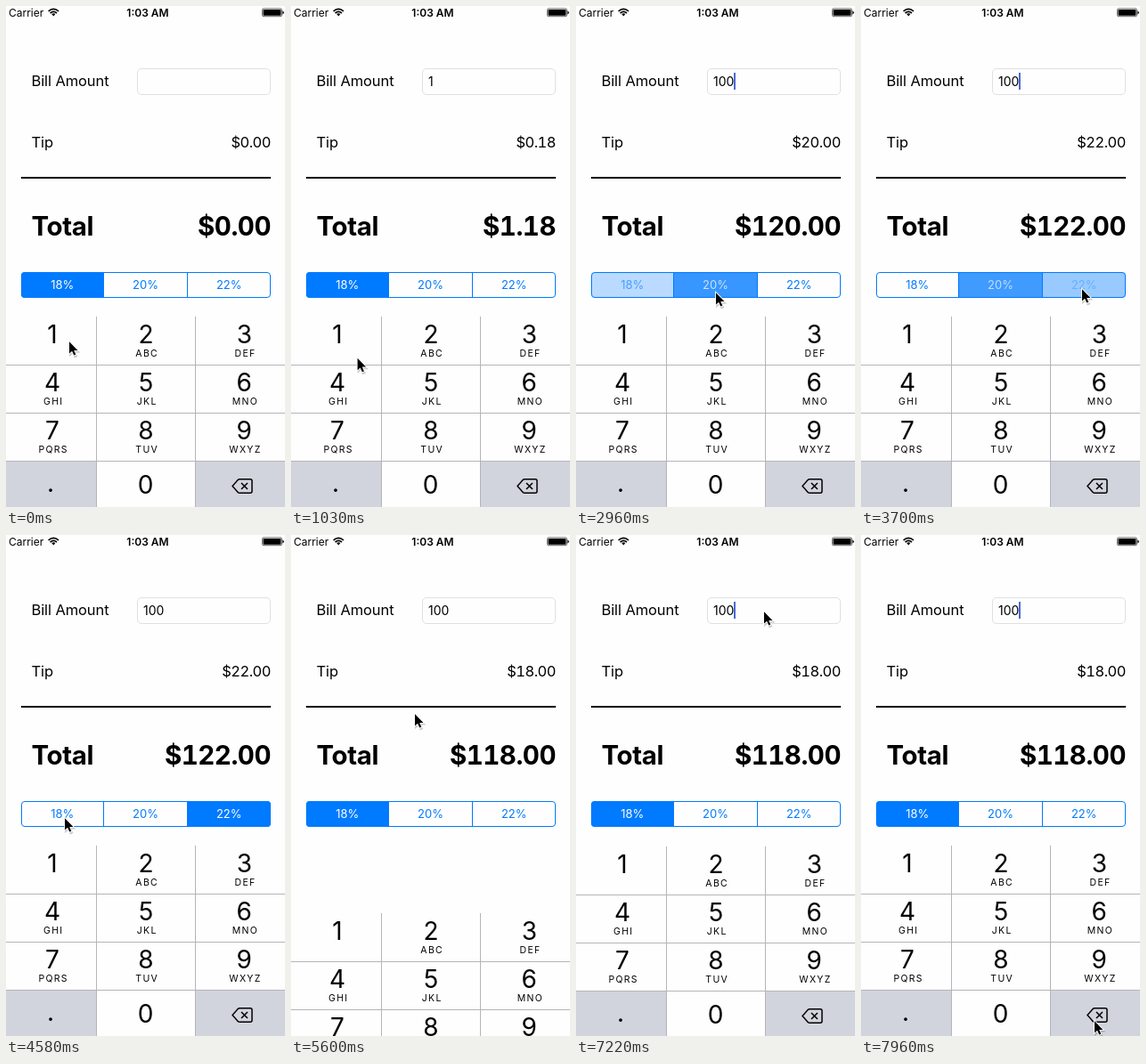
Animation of 313x563 px, one loop 8000 ms. Source, as an HTML page:

```html
<!DOCTYPE html>
<html lang="en">
<head>
<meta charset="utf-8">
<title>Tip calculator</title>
<style>
  html, body { margin: 0; width: 100%; height: 100%; overflow: hidden; background: #fefefe; }
  svg { display: block; width: 313px; height: 563px; }
  text { font-family: Inter, Roboto, sans-serif; font-optical-sizing: none; white-space: pre; }
  .label { font-size: 16.5px; letter-spacing: -.1px; }
  .total { font-size: 29.5px; font-weight: 700; letter-spacing: -.4px; }
  .money { font-variant-numeric: tabular-nums; letter-spacing: -.5px; text-anchor: end; }
  .status { font-size: 12px; }
  .bill { font-size: 14px; }
  .segment { font-size: 13px; }
  .digit { font-size: 28px; }
  .letters { font-size: 10.5px; letter-spacing: 1.3px; }
  .mid { text-anchor: middle; }
</style>
</head>
<body>
<svg viewBox="0 0 313 563">
  <rect width="313" height="563" fill="#fefefe"/>

  <text class="status" x="3" y="11.8">Carrier</text>
  <g fill="none" stroke="#000" stroke-width="1.7">
    <path d="M47.6 5.8Q53.3 .8 59 5.8M49.6 8Q53.3 4.8 57 8"/>
    <path d="M51.2 9.1Q53.3 7.6 55.4 9.1L53.3 11.5Z" fill="#000" stroke="none"/>
  </g>
  <text class="status mid" x="159" y="11.8" font-weight="600">1:03 AM</text>
  <rect x="287.5" y="2.9" width="22" height="8.8" rx="1.6" fill="none" stroke="#000" stroke-width=".6"/>
  <rect x="288.5" y="3.9" width="20" height="6.8" rx=".8"/>
  <path d="M310.4 5.6q1.5 .5 1.5 1.8t-1.5 1.8z"/>

  <text class="label" x="28.5" y="89.7">Bill Amount</text>
  <rect x="147.5" y="70.5" width="149" height="29" rx="4.5" fill="#fefefe" stroke="#e0e0e0"/>
  <text class="bill" id="bill" x="154" y="90"></text>
  <rect id="caret" y="75" width="2" height="19" fill="#4969d9"/>

  <text class="label" x="28.5" y="158.5">Tip</text>
  <text class="label money" id="tip" x="297" y="158.5"></text>
  <rect x="17" y="192" width="280" height="2"/>
  <text class="total" x="28.5" y="258">Total</text>
  <text class="total money" id="total" x="297" y="258"></text>

  <clipPath id="pill"><rect x="17" y="299" width="280" height="29" rx="4"/></clipPath>
  <g id="segments" clip-path="url(#pill)"></g>
  <path d="M109.5 299v29M203.5 299v29" stroke="#007aff"/>
  <rect x="17.5" y="299.5" width="279" height="28" rx="3.5" fill="none" stroke="#007aff"/>

  <g id="keyboard">
    <rect y="349" width="313" height="214" fill="#fefefe"/>
    <path d="M0 511H101V563H0ZM213 511H313V563H213Z" fill="#d1d4dc"/>
    <path id="pressed" fill="#d1d4dc"/>
    <path d="M101.5 349V563M212.5 349V563M0 403.5H313M0 457.5H313M0 511.5H313" stroke="#b5b5b8"/>
    <g id="keys"></g>
    <text class="digit mid" x="50" y="545.5">.</text>
    <g fill="none" stroke="#000" stroke-width="1.5" stroke-linejoin="round">
      <path d="M254 539.5L260.2 532.6Q261 531.7 262.2 531.7H274Q276 531.7 276 533.7V545.3Q276 547.3 274 547.3H262.2Q261 547.3 260.2 546.4Z"/>
      <path d="M264 536l7 7m0-7l-7 7"/>
    </g>
  </g>

  <g id="pointer">
    <g transform="translate(1 1.2) scale(.86)">
      <path d="M1 2V17.5L4.6 14.2 7.2 20 9.6 19 7.1 13.3H12Z" stroke="#000" stroke-width="2" opacity=".2"/>
      <path d="M0 0V15.5L3.6 12.3 6.1 17.9 8.5 16.9 6.1 11.3H11Z" stroke="#fff" stroke-width="2" paint-order="stroke"/>
    </g>
  </g>
</svg>
<script>
const LOOP = 8000, STEP = 147.4, PAD_HEIGHT = 214;
const BLUR = 5450, FOCUS = 6630;
const $ = id => document.getElementById(id);
const clamp = v => Math.min(1, Math.max(0, v));
const ease = p => p * p * (3 - 2 * p);

function add(parent, tag, attrs, content = '') {
  const node = document.createElementNS('http://www.w3.org/2000/svg', tag);
  for (const key in attrs) node.setAttribute(key, attrs[key]);
  node.textContent = content;
  return parent.appendChild(node);
}

const home = { x: 70, y: 376 };
const moves = [
  { from: 150, to: 440, x: 62, y: 375 },
  { from: 960, to: 1300, x: 163, y: 546 },
  { from: 1920, to: 2600, x: 156, y: 321 },
  { from: 3100, to: 3450, x: 247, y: 317 },
  { from: 4220, to: 4560, x: 65, y: 317 },
  { from: 5020, to: 5450, x: 138, y: 200 },
  { from: 5950, to: 6490, x: 210, y: 85 },
  { from: 7300, to: 7950, x: 261, y: 545 }
];
const taps = [{ at: 870, key: '1' }, { at: 1310, key: '0' }, { at: 1460, key: '0' }];
const choices = [{ at: -1000, index: 0 }, { at: 2700, index: 1 }, { at: 3600, index: 2 }, { at: 4700, index: 0 }];
const keyShapes = { 1: 'M0 349H101V403H0Z', 0: 'M102 512H212V563H102Z' };

const segments = [[17, 109.5], [109.5, 203.5], [203.5, 297]].map(([left, right], i) => ({
  fill: add($('segments'), 'rect', { x: left, y: 299, width: right - left, height: 29, fill: '#007aff' }),
  text: add($('segments'), 'text', { class: 'segment mid', x: (left + right) / 2, y: 318 }, 18 + 2 * i + '%')
}));

const columns = [52, 157, 267.3];
['', 'ABC', 'DEF', 'GHI', 'JKL', 'MNO', 'PQRS', 'TUV', 'WXYZ'].forEach((letters, i) => {
  const x = columns[i % 3], y = 379 + 54 * Math.floor(i / 3);
  add($('keys'), 'text', { class: 'digit mid', x, y }, i + 1);
  add($('keys'), 'text', { class: 'letters mid', x: x + 1.2, y: y + 15 }, letters);
});
add($('keys'), 'text', { class: 'digit mid', x: 156.5, y: 548 }, '0');

const pointerAt = t => moves.reduce((p, move) => {
  const k = ease(clamp((t - move.from) / (move.to - move.from)));
  return { x: p.x + (move.x - p.x) * k, y: p.y + (move.y - p.y) * k };
}, home);

// Critically damped spring: falls from 1 to 0 after its start.
function spring(t, start) {
  const x = Math.max(0, t - start) * .013;
  return (1 + x) * Math.exp(-x);
}

function padOffset(t) {
  const hidden = t < FOCUS ? 1 - spring(t, BLUR + 55) : spring(t, FOCUS + 15);
  return Math.round(PAD_HEIGHT * hidden);
}

function caretVisible(t) {
  if (t >= BLUR && t < FOCUS) return false;
  const blinkStart = t < BLUR ? 290 : FOCUS;
  return t >= blinkStart && (t - blinkStart) % 1100 < 700;
}

function segmentLevels(t) {
  const i = choices.findLastIndex(choice => choice.at <= t);
  const p = clamp((t - choices[i].at) / 340);
  const levels = [0, 0, 0];
  if (i > 0) levels[choices[i - 1].index] = 1 - p;
  levels[choices[i].index] = .2 + .8 * p;
  return levels;
}

function draw(time) {
  const t = Math.floor((time % LOOP + 5) / STEP) * STEP;
  const bill = taps.filter(tap => tap.at <= t).map(tap => tap.key).join('');
  const rate = 18 + 2 * choices.findLast(choice => choice.at <= t).index;
  const tip = bill * rate / 100;
  $('bill').textContent = bill;
  $('tip').textContent = '$' + tip.toFixed(2);
  $('total').textContent = '$' + (+bill + tip).toFixed(2);

  $('caret').setAttribute('x', 154 + Math.round(bill && $('bill').getComputedTextLength()));
  $('caret').setAttribute('opacity', +caretVisible(t));

  segmentLevels(t).forEach((level, i) => {
    segments[i].fill.setAttribute('opacity', level);
    segments[i].text.setAttribute('fill', `rgb(${255 * level}, ${122 + 133 * level}, 255)`);
  });

  const held = taps.find(tap => t >= tap.at && t < tap.at + 130);
  $('pressed').setAttribute('d', held ? keyShapes[held.key] : '');

  const { x, y } = pointerAt(t);
  $('keyboard').setAttribute('transform', `translate(0 ${padOffset(t)})`);
  $('pointer').setAttribute('transform', `translate(${x} ${y})`);
}

const start = performance.now();
function tick() {
  draw(performance.now() - start);
  requestAnimationFrame(tick);
}
tick();
</script>
</body>
</html>
```
